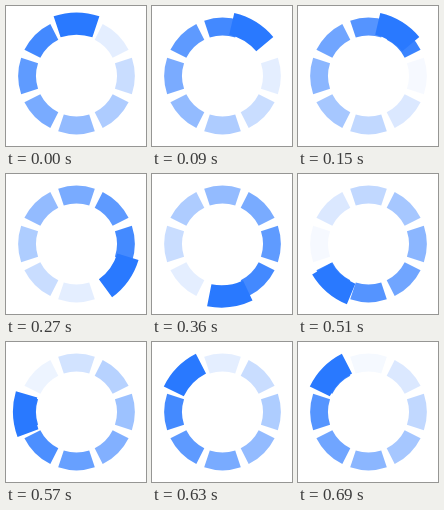
These frames come from a looping animation (140x140 px, 0.72 s). An HTML page:

```html
<!DOCTYPE html>
<html lang="en">
<head>
<meta charset="utf-8">
<title>Loading ring</title>
<style>
html, body { margin: 0; width: 100%; height: 100%; overflow: hidden; background: #fff; }
svg { display: block; width: 100vw; height: 100vh; }
</style>
</head>
<body>
<svg id="ring" viewBox="0 0 140 140" fill="#2979ff"></svg>
<script>
const LOOP = 720, TICK = 30, COUNT = 8, STEP = LOOP / COUNT;
const CX = 70.5, CY = 70, INNER = 40.5, OUTER = 58.3, HALF = 18.3;
const GROW = 1.25, REACH = 63.5;
const svg = document.getElementById('ring');

function point(r, deg) {
  const a = deg * Math.PI / 180;
  return (r * Math.sin(a)).toFixed(2) + ' ' + (-r * Math.cos(a)).toFixed(2);
}

// Ring sector centred on twelve o'clock
function sector() {
  const path = document.createElementNS('http://www.w3.org/2000/svg', 'path');
  path.setAttribute('d',
    `M${point(OUTER, -HALF)}A${OUTER} ${OUTER} 0 0 1 ${point(OUTER, HALF)}` +
    `L${point(INNER, HALF)}A${INNER} ${INNER} 0 0 0 ${point(INNER, -HALF)}Z`);
  svg.appendChild(path);
  return path;
}

function place(path, deg, scale = 1, sink = 0) {
  path.setAttribute('transform',
    `translate(${CX} ${CY}) rotate(${deg}) translate(0 ${sink}) scale(${scale})`);
}

const parts = Array.from({ length: COUNT }, (_, i) => {
  const path = sector();
  place(path, i * 360 / COUNT);
  return path;
});
const head = sector();

function draw(ms) {
  const t = Math.floor((ms % LOOP) / TICK + 1e-6) * TICK;
  const lit = Math.floor(t / STEP) % COUNT;
  parts.forEach((path, i) => {
    // A part lights up one tick after the head reaches it
    const age = (t - i * STEP - TICK + LOOP) % LOOP + TICK;
    path.setAttribute('opacity', 1 - age / LOOP);
  });
  // The head falls behind its slot, then catches up over the turn
  const lag = lit ? 7 * (1 + Math.cos(Math.PI * lit / COUNT)) : 0;
  place(head, lit * 360 / COUNT - lag, GROW, OUTER * GROW - REACH);
}

const start = performance.now();
function loop(now) {
  draw(Math.max(0, now - start));
  requestAnimationFrame(loop);
}
draw(0);
requestAnimationFrame(loop);
</script>
</body>
</html>
```
